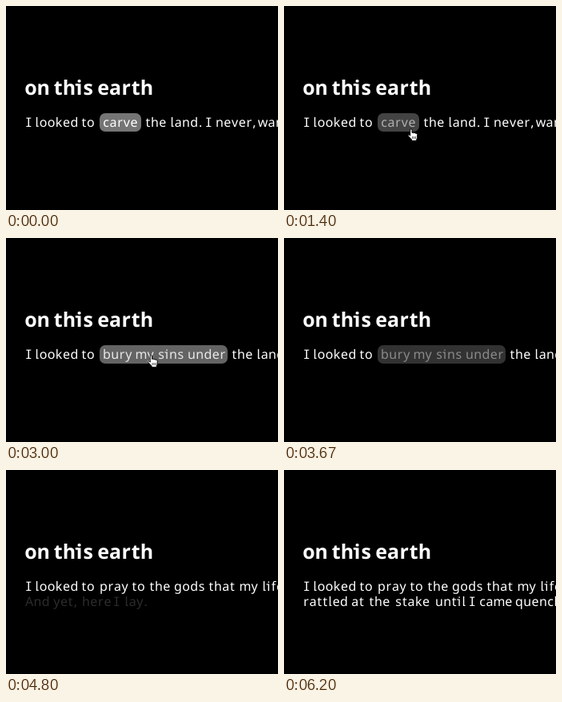
Recreate the animation shown at these times as an HTML page with a canvas. Size 340 by 255 pixels, loop 6740 ms.

```html
<!DOCTYPE html>
<html lang="en">
<head>
<meta charset="utf-8">
<title>on this earth</title>
<style>
  html, body { margin: 0; width: 100%; height: 100%; overflow: hidden; background: #000; }
  canvas { display: block; width: 340px; height: 255px; }
</style>
</head>
<body>
<canvas id="stage" width="340" height="255"></canvas>
<script>
const ctx = document.getElementById('stage').getContext('2d');
ctx.textRendering = 'geometricPrecision';
const LOOP = 6740;
const TITLE = { font: '600 25px "Noto Sans", sans-serif', size: 25, pitch: 15, stem: 0.11 };
const BODY = { font: '16px "Noto Sans", sans-serif', size: 16, pitch: 11.5, stem: 0.075 };
const SLAB = '16px "Noto Sans Mono", monospace';

const ramp = (t, a, b) => Math.min(1, Math.max(0, (t - a) / (b - a)));
const ease = p => p * p * (3 - 2 * p);
const mix = (a, b, p) => a + (b - a) * p;

// Half-monospaced setting: each advance leans towards a common pitch.
function word(text, x, y, { font, size, pitch, stem }) {
  if (text === 'I') {
    ctx.font = SLAB;
    ctx.fillText(text, x - 1.6, y);
    return;
  }
  ctx.font = font;
  x -= size * 0.07;
  for (const ch of text) {
    const width = ctx.measureText(ch).width;
    const advance = mix(width, pitch, 0.2);
    const left = x + (advance - width) / 2;
    ctx.fillText(ch, left, y);
    // small feet of i and l
    if (ch === 'i') ctx.fillRect(left - size * 0.04, y - size * 0.54, size * 0.14, size * stem);
    if (ch === 'l') ctx.fillRect(left + size * 0.15, y - size * stem, size * 0.1, size * stem);
    x += advance;
  }
}

function words(text, xs, y, alpha = 1, style = BODY) {
  ctx.globalAlpha = alpha;
  ctx.fillStyle = '#fff';
  text.split(' ').forEach((w, i) => word(w, xs[i], y, style));
  ctx.globalAlpha = 1;
}

function pill(width, alpha) {
  ctx.globalAlpha = alpha;
  ctx.fillStyle = '#757575';
  ctx.beginPath();
  ctx.roundRect(117, 134, width, 23, 7);
  ctx.fill();
  ctx.globalAlpha = 1;
}

function tail(shift) {
  words('the land. I never, wanted', [175, 206, 250, 263, 316].map(x => x + shift), 151);
}

const hand = new Path2D(
  'M3.2 9.2 V2 Q3.2 .6 4.4 .6 Q5.6 .6 5.6 2 V5.4 Q6.8 4.6 7.8 5.7 ' +
  'Q9 5 10 6.2 Q11.6 5.8 12.2 7.2 V11 Q12.2 12.6 11.2 13.6 V15.4 H5 V14 ' +
  'L.9 9.6 Q.3 8.2 1.4 7.8 Q2.4 7.7 3.2 9.2 Z');

function cursor(x, y) {
  ctx.save();
  ctx.translate(x, y);
  ctx.fillStyle = '#fff';
  ctx.strokeStyle = '#000';
  ctx.lineWidth = 1;
  ctx.fill(hand);
  ctx.stroke(hand);
  ctx.beginPath();
  for (const k of [6, 8, 10]) {
    ctx.moveTo(k, 10);
    ctx.lineTo(k, 13);
  }
  ctx.lineWidth = 0.7;
  ctx.stroke();
  ctx.restore();
}

// Opacity of a phrase: dims under the pointer, then fades after the click.
const phrase = (t, shown, hover, click) =>
  ramp(t, shown, shown + 500) * mix(1, 0.86, ramp(t, hover, hover + 200)) *
  (1 - ramp(t, click, click + 400));

function draw(t) {
  ctx.fillStyle = '#000';
  ctx.fillRect(0, 0, 340, 255);
  words('on this earth', [25, 61, 116], 110.5, 1, TITLE);
  words('I looked to', [25, 37, 95], 151);

  if (t < 1680) {
    const a = phrase(t, -500, 670, 1270);
    pill(52, a);
    words('carve', [122], 151, a);
    tail(0);
  } else if (t < 3880) {
    const a = phrase(t, 1680, 2470, 3470);
    pill(160, a);
    words('bury my sins under', [122, 163, 191, 228], 151, a);
    tail(108);
  } else {
    words('pray to the gods that my life', [118, 158, 180, 211, 254, 293, 321],
      151, ramp(t, 3880, 4380));
    if (t < 4900) {
      words('And yet, here I lay.', [25, 60, 96, 135, 149], 170, 1 - ramp(t, 4470, 4870));
    } else {
      words('rattled at the stake until I came quenched',
        [25, 85, 107, 140, 190, 232, 245, 290], 170, ramp(t, 4900, 5600));
    }
  }

  if (t >= 670 && t < 1530) {
    const p = ease(ramp(t, 640, 870)), q = ease(ramp(t, 1270, 1530));
    cursor(mix(160, 153, p) + 3 * q, mix(162, 150, p) + 6 * q);
  } else if (t >= 2270 && t < 3670) {
    const p = ease(ramp(t, 2270, 2730)), q = ease(ramp(t, 2800, 3000));
    cursor(mix(186, 179, p) - 2 * q, mix(152, 147, p) - q);
  }
}

const begin = performance.now();
function tick() {
  draw((performance.now() - begin) % LOOP);
  requestAnimationFrame(tick);
}
tick();
</script>
</body>
</html>
```
